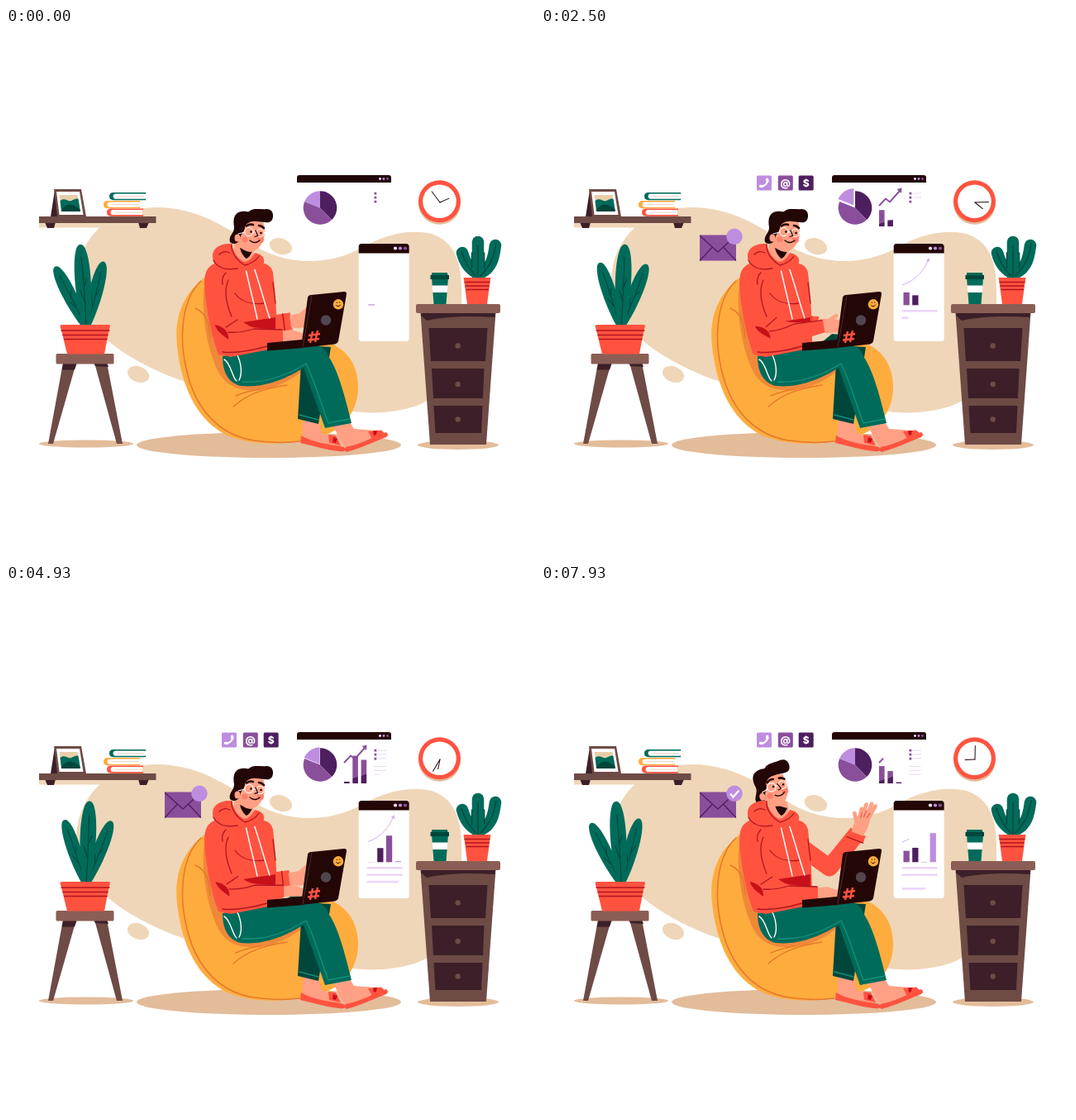
An HTML page for the animation above (8 s loop, 640 by 640 pixels).

```html
<!DOCTYPE html>
<html lang="en">
<head>
<meta charset="utf-8">
<title>Working from home</title>
<style>
html,body{margin:0;width:100%;height:100%;overflow:hidden;background:#fff}
svg{display:block;width:100vw;height:100vh}
.red{fill:#ff5340}.maroon{fill:#c8101a}.skin{fill:#ffa084}.ink{fill:#230606}
.wood{fill:#6e4b45}.top{fill:#8a5e55}.dark{fill:#3c1f28}.green{fill:#006b5a}.deep{fill:#00463b}
.light{fill:#be8de0}.mid{fill:#8a4f9b}.plum{fill:#4e1f5f}.sand{fill:#efd6b8}.shade{fill:#e3bc9a}
.lav{fill:#ead5fa}.white{fill:#fff}.bag{fill:#ffac3e}
.l{fill:none;stroke-width:1.3;stroke-linecap:round;stroke-linejoin:round}
.lr{stroke:#b3141e}.lo{stroke:#e57a2a;stroke-width:1.6}.lw{stroke:#fff;stroke-width:1.4}
.lk{stroke:#230606}.lg{stroke:#00463b}.lt{stroke:#16907a}.lp{stroke:#4e1f5f}
.thin{stroke-width:1}.paddle{stroke:#006b5a;stroke-width:14.500}
text{font:800 12px Inter,Arial,sans-serif;fill:#fff;text-anchor:middle}
</style>
</head>
<body>
<svg viewBox="0 0 640 640">
<defs>
  <linearGradient id="twoTone" gradientUnits="userSpaceOnUse" x1="421" y1="228" x2="424" y2="238">
    <stop offset=".5" stop-color="#8a4f9b"/><stop offset=".5" stop-color="#4e1f5f"/>
  </linearGradient>
  <g id="leaf">
    <path class="green" d="M-5 0C-12 -32 -13 -74 -7 -90C-4 -100 4 -100 7 -90C13 -74 12 -32 5 0Z"/>
    <path class="l lg" d="M0 0C1 -30 1 -55 0 -82M0 -44L5 -56M0 -30L-5 -43"/>
  </g>
</defs>

<!-- backdrop -->
<path class="sand" d="M182 217C228 217 262 238 292 258C334 288 388 289 430 266C460 249 488 243 515 249C539 257 551 278 551 315C552 400 540 440 497 457C460 469 420 468 380 455C300 440 250 440 208 425C150 403 85 365 85 306C86 255 125 217 182 217Z"/>
<ellipse class="sand" cx="332.500" cy="264" rx="14" ry="9.500" transform="rotate(18 332 264)"/>
<ellipse class="sand" cx="160" cy="419" rx="13.500" ry="9.500" transform="rotate(22 160 419)"/>
<ellipse class="shade" cx="318" cy="504.500" rx="160" ry="15.500"/>
<ellipse class="shade" cx="97" cy="503" rx="57" ry="4.500"/>
<ellipse class="shade" cx="547" cy="504.500" rx="49" ry="5.500"/>

<!-- shelf -->
<path class="sand" d="M40 235H173V241.500H40Z"/>
<path class="dark" d="M47 235H60L58 242H50ZM160 235H173L170 242H162Z"/>
<path class="wood" d="M40 228H181.500V236H40Z"/>
<path class="dark" d="M59 196L54 228H65Z"/>
<path class="wood" d="M58 195H91L97 228H62Z"/>
<path class="white" d="M61 198H89L93.500 226H64.500Z"/>
<path fill="#e8cfaa" d="M64.500 202H86.500L90 222H67Z"/>
<path class="green" d="M65.500 209C71 204 75 211 79 209S85 206 87.500 207L90 222H67Z"/>
<path class="deep" d="M67 220C74 211 80 212 89 219L90 222H67Z"/>
<g id="books"></g>

<!-- clock -->
<circle class="shade" cx="524.500" cy="212.500" r="25.300"/>
<circle class="red" cx="524.500" cy="209.800" r="25.500"/>
<circle class="white" cx="524.500" cy="209.800" r="20.300"/>
<path class="l lk thin" id="minute" d="M525 211V194.500"/>
<path class="l lk thin" id="hour" d="M525 211V199"/>

<!-- wide window -->
<path class="ink" d="M352 187V181Q352 178 355 178H463Q466 178 466 181V187Z"/>
<circle cx="452.500" cy="182.500" r="1.400" fill="#f3e6fc"/><circle class="light" cx="457" cy="182.500" r="1.400"/><circle class="mid" cx="461.500" cy="182.500" r="1.400"/>
<g id="pie"></g>
<g id="wideBars" fill="url(#twoTone)"></g>
<path id="trend" d="M409 215L417 206.500L422 210.500L434.500 196.500" pathLength="1" fill="none" stroke="#8a4f9b" stroke-width="1.900"/>
<path id="trendHead" class="mid" d="M430.500 195L436.500 193.500L436 200Z"/>
<path class="mid" d="M445.500 198.700h2.800v2.800h-2.800zM445.500 203.700h2.800v2.800h-2.800zM445.500 208.700h2.800v2.800h-2.800z"/>
<g id="legend" class="lav"></g>

<!-- tall window -->
<rect class="white" x="426.700" y="261" width="61" height="118" rx="3.500"/>
<path class="ink" d="M426.700 272.500V264.500Q426.700 261 430 261H484Q487.700 261 487.700 264.500V272.500Z"/>
<circle cx="471" cy="266.500" r="2.100" fill="#f3e6fc"/><circle class="light" cx="477" cy="266.500" r="2.100"/><circle class="mid" cx="483" cy="266.500" r="2.100"/>
<g id="tallBars"></g>
<path id="curve" d="M437 311C454 305 464 293 468.500 280" pathLength="1" fill="none" stroke="#d3aef0"/>
<path id="curveHead" fill="#d3aef0" d="M465.800 281L469.500 278L470.300 283Z"/>
<g id="textLines" class="lav"></g>

<!-- contact icons -->
<g class="icon" data-x="270"><rect class="light" x="-9" y="-9" width="18" height="18" rx="1.500"/>
  <path class="l lw" style="stroke-width:2.200" d="M4 -4.500C5 0 0 5 -4.500 4"/><path class="l lw" style="stroke-width:3.200" d="M3.500 -4.500L4 -2M-4.500 3.800L-2.300 4"/></g>
<g class="icon" data-x="295.800"><rect class="mid" x="-9" y="-9" width="18" height="18" rx="1.500"/><text y="4">@</text></g>
<g class="icon" data-x="320.700"><rect class="plum" x="-9" y="-9" width="18" height="18" rx="1.500"/><text y="4.400">$</text></g>

<!-- envelope -->
<g id="mail">
  <rect class="mid" x="192" y="250.500" width="44" height="31"/>
  <path class="l lp" d="M192.500 251.500L214 271L235.500 251.500M192.500 281L207.500 265M235.500 281L220.500 265"/>
  <circle class="light" cx="234" cy="252.300" r="9.700"/>
  <path id="check" d="M229 252.500L232.500 256.500L239.500 248.500" pathLength="1" fill="none" stroke="#fff" stroke-width="2.200"/>
</g>

<!-- stool and plant -->
<path class="wood" d="M69 405H85L57 503H51ZM107 405H122L141 503H134Z"/>
<path class="dark" d="M69.500 405H86L83 413.500H67.500ZM106 405H122L124 410L108 409Z"/>
<rect class="top" x="60.500" y="394" width="70" height="12.500" rx="1.500"/>
<use href="#leaf" id="leafL"/><use href="#leaf" id="leafR"/><use href="#leaf" id="leafC"/>
<path class="red" d="M67.500 359H124.500Q126 359 126 361L124.500 366L119 394.500H74L67 366L65.500 361Q65.500 359 67.500 359Z"/>
<path class="l lr" d="M67 366H125M69 371.500H123M70.500 376.500H122"/>

<!-- cabinet -->
<path class="wood" d="M501.500 344H592.500L581 504H513Z"/>
<path class="dark" d="M502 344.500H592L591.500 350C560 348 530 349 509 354L502 348Z"/>
<rect class="top" x="496" y="334" width="102" height="11" rx="2"/>
<path class="dark" d="M511.500 363H582.500L580 403H514ZM515 412H578.500L577 448H517ZM517.500 457H576.500L575 490H519.500Z"/>
<g class="wood"><circle cx="546.700" cy="384.500" r="3.200"/><circle cx="546.700" cy="431" r="3.200"/><circle cx="546.700" cy="473.500" r="3.200"/></g>
<path class="green" d="M515 302H535L532.500 334H517.500Z"/>
<path class="white" d="M515.500 311.500H534.500L533.800 320H516.300Z"/>
<path class="deep" d="M515.500 296H533.500L534.500 299H536V304H513.500V299H515Z"/>
<path class="green" d="M515.500 296H533.500L534.500 299H514.700Z"/>
<path class="l paddle" d="M569 296C560 291 555 284 552 272M575 296C587 290 590 279 592 263M571 300V259"/>
<path class="l lg" d="M571 263V302M551 270C555 284 561 291 568 300M593 261C590 279 586 287 574 300M563.500 272V290M578.700 272V290"/>
<path class="red" d="M553.500 302H586.500L585.500 308L582 334H558L554.500 308Z"/>
<path class="l lr" d="M555 307.500H585M556 312H584M557 316.500H583.500"/>

<!-- bean bag -->
<path class="bag" d="M243 300C215 320 203 348 207 385C212 432 230 475 268 493C300 507 350 505 385 493C411 484 427 460 426 432C425 402 407 383 380 378L300 380L250 355Z"/>
<path fill="#f0883a" d="M243 302C234 325 240 375 252 405C260 428 275 439 300 438C325 437 345 427 362 412L300 395L258 390L246 345Z"/>
<path class="l lo" d="M236 306C215 325 208 368 218 412C228 458 255 492 300 499C320 502 340 502 355 500M229 339C243 345 246 358 247 375M275 458C292 443 312 436 340 432M278 445C290 440 298 438 308 437"/>

<!-- feet and trousers -->
<path class="skin" d="M360 472L378 476L382 490L402 499L406 507L358 497Z"/>
<path class="red" d="M357 493C372 502 390 503 409 507Q412 512 407 512.500C388 511 370 505 356 502Z"/>
<path class="red" d="M390 492L399 493L405 505L391 502Z"/><path class="maroon" d="M396 495L401 497L399 502L395 501Z"/>
<path class="skin" d="M396 482L416 477L421 485L448 487L455 492L411 508L404 498Z"/>
<path class="red" d="M411 507C428 504 443 495 460 489Q464 492 460 495C444 501 428 509 412 513Q408 511 411 507Z"/>
<path class="red" d="M438 488L454 486.500L460 492L444 499Z"/><path class="maroon" d="M444 487.500L449 487L448 492L445 493Z"/>
<path class="deep" d="M357 405L353 473L378 479L386 430L393 386L360 384Z"/>
<path class="l lt" d="M355 468L378 474"/>
<path class="deep" d="M340 380L352 370L372 372V390H340Z"/>
<path class="green" d="M262 397C262 415 268 429 284 433C312 436 340 424 360 411L386 484L418 478C410 445 402 415 390 397C386 386 375 380 358 382L316 388Z"/>
<path class="l lt" d="M286 428C315 430 340 420 363 406C373 425 381 455 390 478L416 473"/>
<path class="l lw" d="M264 401C272 405 274 424 279 427M279 394C285 405 286 419 282 426"/>

<!-- far arm -->
<path id="farSleeve" fill="none" stroke="#ff5340" stroke-width="21" stroke-linejoin="round"/>
<g id="farHand">
  <path class="red" d="M-9 -10.500H0V10.500H-9Z"/><path class="l lr" d="M-9 -10.500V10.500"/>
  <path class="skin" d="M-1 -7C8 -9 14 -8 21 -7L23 7C15 10 7 10 -1 7Z"/>
  <path d="M18 5.500L38 8.500M18 2L39 3.500M18 -2L36 -2.500M17 -4L29 -6M9 -4L21 -12" fill="none" stroke="#ffa084" stroke-width="4.600" stroke-linecap="round"/>
  <path class="l" stroke="#e2664f" d="M21 4L28 5.500M21 0L29 .5M19 -3L25 -4"/>
</g>

<!-- hoodie -->
<path class="red" d="M252 285C241 290 239 300 240.500 318C243 345 249 375 257 395L272 398L318 389L328 384C328 350 326 322 323 296C321 287 314 285 308 284Z"/>
<path class="maroon" d="M287 356L326 350V364L300 364Z"/>
<path class="l lr" d="M269 305C263 318 267 335 273 349M277 321C284 331 297 335 312 333M266 296C262 300 261 305 262 310M323 308L326 333M262 392C278 394 298 390 316 385"/>
<g id="nearArm">
  <path class="skin" d="M330 367L346 365L358 369L364 373L361 379L330 379Z"/>
  <path class="red" d="M250 355L286 356C292 362 304 364 335 365V380C310 383 290 388 268 389C257 385 251 370 250 355Z"/>
  <path class="maroon" d="M252.500 359C263 361 270 367 269 377C264 372 256 369 252.500 359Z"/>
  <path class="l lr" d="M269 368C280 369 290 367 300 364L334 365M266 362L280 353"/>
</g>
<path class="l lw" d="M289 287C294 310 300 333 304 352M298 284C306 306 312 330 319 351"/>
<path class="skin" d="M277 256L274 278L288 288L300 276L298 262Z"/>
<path class="ink" d="M283 266L298 270C296 274 294 278 290.500 279C287 276 284 271 283 266Z"/>

<!-- head -->
<g id="head">
  <path class="skin" d="M283 238L300 231L312 236L313 247C313 258 307 268 297 271C289 271 281 265 278 258Z"/>
  <path class="ink" d="M271 259C269 251 276 249 276 241C274 230 277 223 285 222C290 221 292 223 294 222C299 217 308 220 315 219C324 219 324 228 322 232C319 238 311 234 303 234C296 233 291 236 289 241C289 247 284 248 283 256C280 262 274 262 271 259Z"/>
  <ellipse class="skin" cx="280" cy="254" rx="3.500" ry="4.500"/>
  <circle cx="308" cy="256" r="4" fill="#ff7f6c"/><circle cx="289" cy="256" r="3.600" fill="#ff7f6c"/>
  <path class="l lk" style="stroke-width:2.600" d="M291 239.500Q295 236.500 299 238M306 239Q309 239 312 242"/>
  <path class="l lw thin" d="M281 249L289 247M299 247H303"/>
  <circle class="l lw thin" cx="294" cy="246.500" r="5.200"/><circle class="l lw thin" cx="307.500" cy="248" r="4.800"/>
  <circle class="ink" cx="296.500" cy="246.500" r="1.300"/><circle class="ink" cx="308.500" cy="248" r="1.300"/>
  <path class="l lk" d="M302 245L304.500 251.500L301 252.500M295 257Q301 262 307 257"/>
</g>
<path class="red" d="M273 261C260 260 249 266 250 277C250 289 262 294 280 292C290 296 306 292 311 286C315 279 309 273 301 272C298 278 293 283 288 283C280 279 275 271 273 261Z"/>
<path class="l lr" d="M251 281C256 291 268 293 280 291M273 262C272 272 280 282 289 287C297 285 303 281 306 276M258 274C262 270 267 270 271 272"/>

<!-- laptop -->
<path class="ink" d="M316 381L358 377L360 387L316 390.500Z"/>
<path class="ink" d="M369 323L409 319Q412.500 319 412 322L402 379Q401 382 398 382.500L357 387L365 326Q366 323 369 323Z"/>
<path class="l" stroke="#5a3634" style="stroke-width:.8" d="M370 324L359 386"/>
<circle cx="387" cy="353.500" r="6.200" fill="#51464e"/>
<circle class="bag" cx="402" cy="334.300" r="6.200"/>
<path class="l lk thin" d="M399.500 335.500Q402 338.500 404.500 335M400.300 332V332.500M403.700 331.700V332.200"/>
<path d="M371 367L368 381M377 366L374 380M366 372L380 370M365 377.500L379 376" fill="none" stroke="#ff5340" stroke-width="2.400"/>
</svg>
<script>
const LOOP = 8000;
const BAR_PERIOD = 5.1;
const $ = id => document.getElementById(id);
const mix = (a, b, k) => a + (b - a) * k;

// eased progress from 0 to 1 between two times in seconds
function span(t, from, to) {
  const k = Math.min(1, Math.max(0, (t - from) / (to - from)));
  return k * k * (3 - 2 * k);
}
function set(node, attrs) {
  for (const name in attrs) node.setAttribute(name, attrs[name]);
}
function add(parent, tag, attrs) {
  const node = document.createElementNS('http://www.w3.org/2000/svg', tag);
  set(node, attrs);
  return $(parent).appendChild(node);
}

[[125, 199, 'green'], [118, 209, 'bag'], [122, 218.5, 'red']].forEach(([x, y, tone]) => {
  add('books', 'path', { class: tone, d: `M${x + 44} ${y}H${x + 5}Q${x} ${y} ${x} ${y + 4.6}T${x + 5} ${y + 9.3}H${x + 44}v-1.8H${x + 7}v-5.700H${x + 44}Z` });
  add('books', 'path', { class: 'white', d: `M${x + 43} ${y + 1.8}H${x + 6}Q${x + 3} ${y + 4.6} ${x + 6} ${y + 7.5}H${x + 43}Z` });
  add('books', 'path', { class: 'l', stroke: '#d9c3ae', style: 'stroke-width:.7', d: `M${x + 10} ${y + 4.6}H${x + 42}` });
});

function sector(tone, from, to) {
  const point = deg => {
    const a = deg * Math.PI / 180;
    return `${380 + 20.3 * Math.sin(a)} ${217.5 - 20.3 * Math.cos(a)}`;
  };
  return add('pie', 'path', { class: tone, d: `M380 217.500L${point(from)}A20.300 20.300 0 0 1 ${point(to)}Z` });
}
sector('plum', 0, 136);
sector('mid', 136, 292);
const slice = sector('light', 292, 360);

// each bar swells in turn; crest is the time of its first full height
const wideBars = [21, 39, 36].map((peak, i) => ({
  node: add('wideBars', 'rect', { x: 409 + 10.3 * i, width: 6.6 }),
  peak, base: 240, crest: 2.9 + 1.4 * i,
}));
const tallBars = [[16, 'mid'], [27, 'plum'], [37, 'mid'], [43, 'light']].map(([peak, tone], i) => ({
  node: add('tallBars', 'rect', { x: 438.5 + 10.7 * i, width: 7.3, class: tone }),
  peak, base: 335.3, crest: 2.2 + 1.67 * i,
}));
const bars = [...wideBars, ...tallBars];

const textLines = [0, 1, 2, 3].map(i => add('textLines', 'rect', { x: 436.5, y: 341 + 8.4 * i, height: 2.5 }));
const legend = [0, 1, 2, 3, 4, 5].map(i =>
  add('legend', 'rect', { x: i < 3 ? 450 : 445.5, y: 199.6 + 4.8 * i + (i < 3 ? 0 : 5), height: 1 }));
const icons = document.querySelectorAll('.icon');

function reveal(node, start, end) {
  set(node, { 'stroke-dasharray': `0 ${start} ${Math.max(0, end - start)} 2`, visibility: end > start ? 'visible' : 'hidden' });
}
function drawArrow(t, name, eraseFrom, eraseTo) {
  const again = t > 7.2;
  const end = again ? span(t, 7.5, 9) : span(t, .8, 2.4);
  const start = again ? 0 : span(t, eraseFrom, eraseTo);
  reveal($(name), start, end);
  set($(name + 'Head'), { opacity: end > .97 && start < .999 ? 1 : 0 });
}

function drawCharts(t) {
  const burst = span(t, .8, 1.6) - span(t, 4.4, 5.2);
  set(slice, { transform: `translate(${-1.6 * burst} ${-3 * burst})` });
  for (const { node, peak, base, crest } of bars) {
    const phase = Math.max(-.5, (t - crest) / BAR_PERIOD);
    const height = peak * (1 + Math.cos(2 * Math.PI * phase)) / 2;
    set(node, { y: base - height, height });
  }
  textLines.forEach((line, i) => {
    const grown = span(t, .5 + 1.5 * i, 2.3 + 1.5 * i);
    const withdrawn = i > 1 ? span(t, 3.2 + 1.35 * i, 4.8 + 1.4 * i) : 0;
    set(line, { width: 43 * grown * (1 - withdrawn) });
  });
  legend.forEach((line, i) => set(line, { width: (i < 3 ? 10 : 14) * span(t, 1 + .7 * i, 1.8 + .7 * i) }));
  drawArrow(t, 'trend', 5, 6.75);
  drawArrow(t, 'curve', 4.8, 6.2);
}

function drawMessages(t) {
  icons.forEach((icon, i) => {
    const scale = span(t, .55 + .25 * i, 1 + .25 * i);
    set(icon, { transform: `translate(${icon.dataset.x} 187.500) scale(${scale})` });
  });
  set($('mail'), { transform: `translate(0 ${30 * (1 - span(t, 1.4, 2.5))})`, opacity: span(t, 1.45, 2.2) });
  reveal($('check'), 0, span(t, 5.3, 6.1));
}

function drawPlant(t) {
  const sway = -Math.cos(2 * Math.PI * t / 7.35);
  const place = (name, x, angle, sx, sy) =>
    set($(name), { transform: `translate(${x} 360) rotate(${angle}) scale(${sx} ${sy})` });
  place('leafC', 97, .3 + 4.4 * sway, .88, 1.01);
  place('leafL', 95.5, -21 + 5.8 * sway, .76, .82);
  place('leafR', 98.5, 19 + 4.8 * sway, .76, .82);
}

function drawPerson(t) {
  set($('head'), { transform: `rotate(${-19 * span(t, 4.9, 6.3)} 281 291)` });

  const lift = 1.15 * (span(t, 0, 1) - span(t, 4.1, 5.2));
  set($('nearArm'), { transform: `translate(${7 * lift} 0) rotate(${-8 * lift} 262 372)` });

  const wave = span(t, 6.35, 7.65);
  const elbow = [mix(316, 349, wave), mix(359, 342, wave)];
  const wrist = [mix(345 - 8 * lift, 383, wave), mix(355 + 4 * lift, 300, wave)];
  const forearm = Math.atan2(wrist[1] - elbow[1], wrist[0] - elbow[0]) * 180 / Math.PI;
  set($('farSleeve'), { d: `M312 315L${elbow}L${wrist}` });
  set($('farHand'), { transform: `translate(${wrist}) rotate(${forearm - 18 * wave})` });
}

function drawClock(t) {
  set($('minute'), { transform: `rotate(${-37 + 50.2 * t} 525 211)` });
  set($('hour'), { transform: `rotate(${66 + 25.4 * t} 525 211)` });
}

function frame(now) {
  const t = (now % LOOP) / 1000;
  drawClock(t);
  drawCharts(t);
  drawMessages(t);
  drawPlant(t);
  drawPerson(t);
  requestAnimationFrame(frame);
}
frame(0);
</script>
</body>
</html>
```
